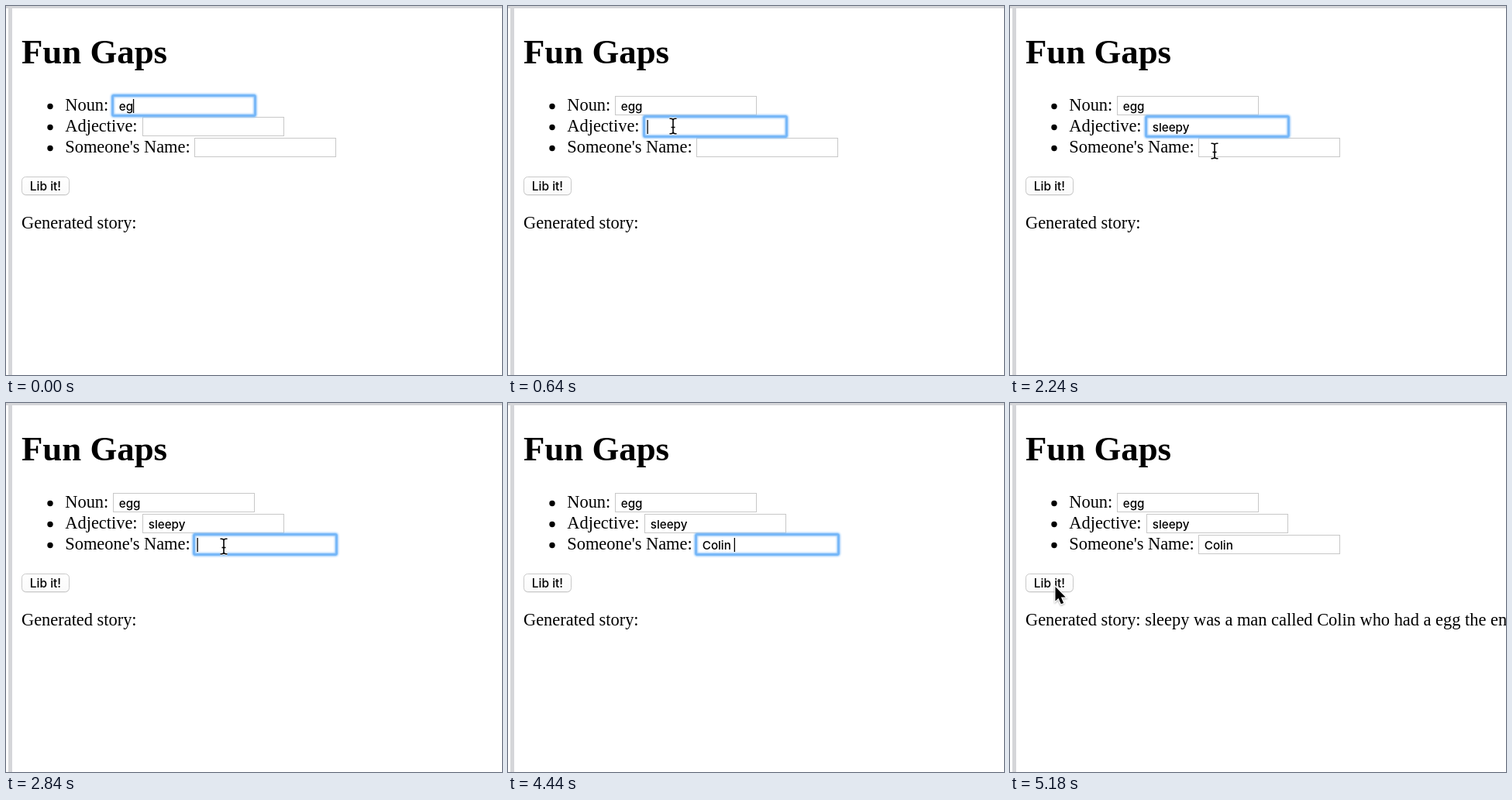
An HTML page for the animation above (5.32 s loop, 640 by 476 pixels).

```html
<!DOCTYPE html>
<html lang="en">
<head>
<meta charset="utf-8">
<title>Fun Gaps</title>
<style>
  html, body { margin: 0; width: 100%; height: 100%; overflow: hidden; background: #fff; }
  svg { display: block; }
  text { font: 22.4px "Liberation Serif", "Times New Roman", serif; white-space: pre; }
  .title { font-size: 44.8px; font-weight: bold; }
  .ui { font: 450 15.2px Inter, "Open Sans", sans-serif; }
  .box { fill: #fff; stroke: #c8c8c8; }
  .glow { fill: none; stroke: #8cc4fb; stroke-width: 4.4; filter: url(#soft); }
  .ring { fill: none; stroke: #74b6f8; stroke-width: 2.4; }
  #beam path { fill: none; stroke: #000; stroke-width: 1.6; }
  #beam .halo { stroke: #fff; stroke-width: 3.6; }
  #arrow { stroke: #fff; stroke-width: 2.4; paint-order: stroke; filter: drop-shadow(0 1px 1px #0005); }
</style>
</head>
<body>
<svg width="640" height="476" viewBox="0 0 640 476">
  <defs>
    <filter id="soft" x="-10%" y="-50%" width="120%" height="200%"><feGaussianBlur stdDeviation="1"/></filter>
    <linearGradient id="sheen" x2="0" y2="1">
      <stop stop-color="#fff"/><stop offset="1" stop-color="#fafafa"/>
    </linearGradient>
  </defs>
  <rect width="640" height="3" fill="#d5d6d9"/>
  <rect x="3" width="5" height="476" fill="#d5d6d9"/>
  <text class="title" x="20" y="74">Fun Gaps</text>
  <g id="form"></g>
  <rect x="20.5" y="221" width="61" height="23.5" rx="5" fill="#ddd"/>
  <rect x="20.5" y="220.5" width="61" height="23" rx="5" fill="url(#sheen)" stroke="#c9c9c9"/>
  <text class="ui" x="30.8" y="238" style="font-size:15.5px">Lib it!</text>
  <text id="story" x="20" y="287"></text>
  <g id="beam"></g>
  <path id="arrow" d="M.5 2v18.5l4-3.8 3.4 7.6 3.3-1.4-3.3-7.4h5.8z"/>
</svg>
<script>
const LOOP = 5320;
const BLUR_AT = 5060, STORY_AT = 5120;
const IBEAM = 'M-4.5-9.7H-3Q0-9.7 0-7.5Q0-9.7 3-9.7H4.5M0-8V8M-4.5 9.7H-3Q0 9.7 0 7.5Q0 9.7 3 9.7H4.5M-2.5 1.5H2.5';
const $ = id => document.getElementById(id);

// keys: time at which each value appears; focus: from, to; off: spans with the caret hidden
const fields = [
  { label: 'Noun:', x: 138, y: 116, focus: [0, 480],
    keys: [[0, ' eg'], [40, ' egg']], off: [] },
  { label: 'Adjective:', x: 176, y: 143, focus: [480, 2740],
    keys: [[900, ' s'], [1100, ' sl'], [1160, ' sle'], [1300, ' slee'], [1620, ' sleep'], [1940, ' sleepy']],
    off: [[880, 900], [2120, 2500]] },
  { label: "Someone's Name:", x: 243, y: 170, focus: [2740, BLUR_AT],
    keys: [[3920, ' C'], [4100, ' Co'], [4140, ' Col'], [4180, ' Coli'], [4240, ' Colin'], [4440, ' Colin ']],
    off: [[3240, 3920]] }
];

// pointer strokes: points are [time, x, y]
const moves = [
  { kind: 'beam', end: 900, path: [[360, 197, 178], [460, 209, 160], [560, 213, 155], [760, 213, 155], [880, 213, 156]] },
  { kind: 'beam', end: 2700, path: [[2120, 233, 165], [2180, 248, 200], [2240, 264, 187], [2360, 268, 181], [2520, 269, 181], [2700, 270, 182]] },
  { kind: 'beam', end: 3920, path: [[2700, 270, 182], [2840, 281, 185], [3160, 281, 186], [3280, 282, 186], [3420, 279, 186], [3640, 272, 187], [3880, 277, 185]] },
  { kind: 'arrow', end: LOOP, path: [[4780, 235, 190], [4820, 150, 212], [4860, 75, 227], [4900, 55, 232], [5000, 58, 235]] }
];

const within = (t, [a, b]) => t >= a && t < b;
const show = (el, on) => el.setAttribute('visibility', on ? 'visible' : 'hidden');
const setText = (el, s) => { if (el.textContent !== s) el.textContent = s; };

function add(parent, tag, attrs = {}, text = '') {
  const el = document.createElementNS('http://www.w3.org/2000/svg', tag);
  for (const k in attrs) el.setAttribute(k, attrs[k]);
  el.textContent = text;
  return parent.appendChild(el);
}

const form = $('form');
for (const f of fields) {
  add(form, 'circle', { cx: 57, cy: f.y + 13.5, r: 3.7 });
  add(form, 'text', { x: 76.3, y: f.y + 19 }, f.label);
  add(form, 'rect', { class: 'box', x: f.x + .5, y: f.y + .5, width: 182, height: 24 });
}
// the focus ring lies over the neighbouring rows
for (const f of fields) {
  const edge = { x: f.x - .5, y: f.y - .5, width: 184, height: 26, rx: 1.5 };
  f.halo = add(form, 'g');
  add(f.halo, 'rect', { class: 'glow', ...edge });
  add(f.halo, 'rect', { class: 'ring', ...edge });
  f.text = add(form, 'text', { class: 'ui', x: f.x + 3.7, y: f.y + 19 });
  f.caret = add(form, 'rect', { y: f.y + 4, width: 1.3, height: 18 });
}
add($('beam'), 'path', { class: 'halo', d: IBEAM });
add($('beam'), 'path', { d: IBEAM });

function pointAt(path, t) {
  const i = path.findIndex(p => p[0] > t);
  if (i < 0) return path[path.length - 1].slice(1);
  const [a, b] = [path[i - 1], path[i]];
  const k = (t - a[0]) / (b[0] - a[0]);
  return [1, 2].map(n => Math.round(a[n] + (b[n] - a[n]) * k));
}

function draw(t) {
  for (const f of fields) {
    const key = f.keys.filter(k => k[0] <= t).pop();
    const value = key ? key[1] : '';
    const focused = within(t, f.focus);
    setText(f.text, value);
    show(f.halo, focused);
    show(f.caret, focused && !f.off.some(span => within(t, span)));
    f.caret.setAttribute('x', f.x + 3.5 + (value ? f.text.getComputedTextLength() : 0));
  }
  setText($('story'), 'Generated story:' +
    (t >= STORY_AT ? ' sleepy was a man called Colin who had a egg the end' : ''));

  const move = moves.find(m => within(t, [m.path[0][0], m.end]));
  for (const kind of ['beam', 'arrow']) {
    const on = !!move && move.kind === kind;
    show($(kind), on);
    if (on) $(kind).setAttribute('transform', `translate(${pointAt(move.path, t)})`);
  }
}

const start = performance.now();
function tick() {
  draw((performance.now() - start) % LOOP);
  requestAnimationFrame(tick);
}
tick();
</script>
</body>
</html>
```
